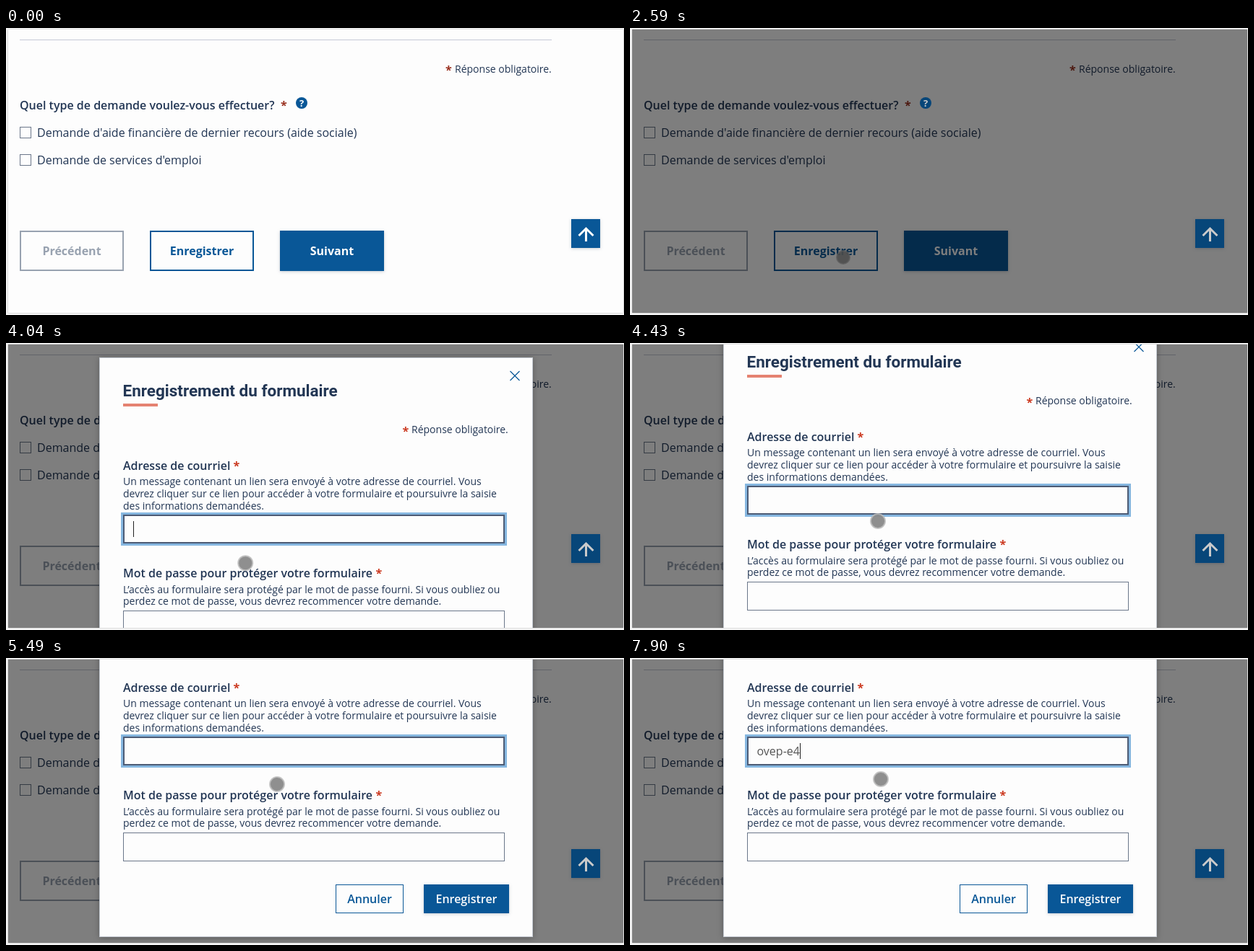
These frames come from a looping animation (855 px wide and 398 px high, 8 s). An HTML page:

```html
<!DOCTYPE html>
<html lang="fr">
<head>
<meta charset="utf-8">
<title>Enregistrement du formulaire</title>
<style>
html, body { margin: 0; width: 100%; height: 100%; overflow: hidden; background: #f6f6f6; }
svg { display: block; width: 100%; height: 100%; }
text { font: 16px "Open Sans", sans-serif; fill: #223654; white-space: pre; }
.small { font-size: 14px; }
.semi { font-weight: 600; }
.bold { font-weight: 700; }
.mid { text-anchor: middle; }
.title { font: 700 22.5px Roboto, sans-serif; }
.star { font-weight: 700; fill: #99301f; }
#modal .star { fill: #cb381f; }
.blue { fill: #095797; }
.white { fill: #fdfdfd; }
.muted { fill: #98a2b0; }
.box { fill: #fdfdfd; stroke: #6b778a; }
.outline { fill: #fdfdfd; stroke: #095797; }
.raised { filter: drop-shadow(0 1px 2px #22365440); }
#typed { fill: #555; }
</style>
</head>
<body>
<svg viewBox="0 0 855 398">
  <defs>
    <clipPath id="view"><rect x="3" y="2" width="851" height="393"/></clipPath>
  </defs>
  <rect x="2.5" y="1.5" width="852" height="394" rx="1" fill="#fdfdfd" stroke="#dedede"/>

  <g clip-path="url(#view)">
    <path d="M19 16.5H755" stroke="#c5c8d6"/>
    <text class="star" x="608" y="64">*</text>
    <text class="small" x="621" y="62">Réponse obligatoire.</text>
    <text class="semi" x="19" y="113">Quel type de demande voulez-vous effectuer?</text>
    <text class="star" x="380" y="113">*</text>
    <rect class="box" x="19.5" y="137.5" width="15" height="15"/>
    <text x="43" y="151">Demande d'aide financière de dernier recours (aide sociale)</text>
    <rect class="box" x="19.5" y="175.5" width="15" height="15"/>
    <text x="43" y="189">Demande de services d'emploi</text>

    <rect x="20" y="282" width="142" height="54" fill="#fdfdfd" stroke="#98a2b0" stroke-width="2"/>
    <text class="bold mid muted" x="91" y="315">Précédent</text>
    <rect class="outline" x="200" y="282" width="142" height="54" stroke-width="2"/>
    <text class="bold mid blue" x="271" y="315">Enregistrer</text>
    <rect class="blue raised" x="379" y="281" width="144" height="56"/>
    <text class="bold mid white" x="451" y="315">Suivant</text>

    <rect id="dim" x="3" y="2" width="851" height="393" opacity="0"/>

    <g id="icons">
      <circle class="blue" cx="409" cy="104" r="8"/>
      <text class="bold mid white" x="409" y="109" style="font-size:13px">?</text>
      <rect class="blue raised" x="782" y="265" width="40" height="40"/>
      <path d="M802.5 296V278M792.5 288l10-10 10 10" fill="none" stroke="#fdfdfd" stroke-width="3"/>
    </g>

    <g id="modal" opacity="0">
      <rect x="129.5" y="34.5" width="599" height="495" fill="#fdfdfd" stroke="#c5cad2" style="filter:drop-shadow(0 1px 4px #0004)"/>
      <path d="M697.5 53l13 13m0-13l-13 13" stroke="#095797" stroke-width="1.2"/>
      <text class="title" x="161.5" y="88">Enregistrement du formulaire</text>
      <rect x="162" y="98" width="48" height="4" fill="#e58271"/>
      <text class="star" x="548.5" y="142">*</text>
      <text class="small" x="561" y="139">Réponse obligatoire.</text>

      <text class="semi" x="162" y="190">Adresse de courriel</text>
      <text class="star" x="314.5" y="190">*</text>
      <text class="small" x="162" y="211">Un message contenant un lien sera envoyé à votre adresse de courriel. Vous</text>
      <text class="small" x="162" y="228">devrez cliquer sur ce lien pour accéder à votre formulaire et poursuivre la saisie</text>
      <text class="small" x="162" y="245">des informations demandées.</text>
      <rect x="159" y="249" width="534" height="46" fill="#86b7e0"/>
      <rect x="163" y="253" width="526" height="38" fill="#fdfdfd" stroke="#4c5b75" stroke-width="2"/>
      <text id="typed" x="175.5" y="278"></text>
      <rect id="caret" x="176" y="261" width="1" height="22" fill="#222"/>

      <text class="semi" x="162" y="339">Mot de passe pour protéger votre formulaire</text>
      <text class="star" x="511.5" y="339">*</text>
      <text class="small" x="162" y="361">L’accès au formulaire sera protégé par le mot de passe fourni. Si vous oubliez ou</text>
      <text class="small" x="162" y="377">perdez ce mot de passe, vous devrez recommencer votre demande.</text>
      <rect class="box" x="162.5" y="385.5" width="527" height="39"/>

      <rect class="outline" x="456.5" y="457.5" width="93" height="39"/>
      <text class="semi mid blue" x="503" y="483">Annuler</text>
      <rect class="blue raised" x="578" y="457" width="118" height="40"/>
      <text class="semi mid white" x="637" y="483">Enregistrer</text>
    </g>
  </g>

  <circle id="cursor" r="10" stroke-width="2" visibility="hidden"/>
</svg>
<script>
const LOOP = 8000;
const [dim, icons, modal, typed, caret, cursor] =
  ['dim', 'icons', 'modal', 'typed', 'caret', 'cursor'].map(id => document.getElementById(id));

// Keyframes: [time, value, ...]
const pointerPath = [
  [1150, 415, 393], [1350, 372, 362], [1600, 312, 327], [1840, 295, 318],
  [3520, 295, 318], [3750, 327, 326], [3900, 327, 326], [4430, 343, 247],
  [4700, 351, 225], [4790, 351, 225], [4970, 359, 204], [5120, 359, 204],
  [5490, 375, 175], [5620, 375, 175], [5880, 375, 169], [6210, 375, 169], [6400, 347, 168]
];
const scrollPath = [
  [3900, 0], [4430, 54], [4700, 86], [4770, 88], [4970, 113], [5120, 113], [5490, 143]
];
const dimPath = [[2480, 0], [2590, .5]];
const modalPath = [[2640, 0], [2840, 1]];

const email = 'ovep-e4';
const keyTimes = [6790, 6870, 6950, 7040, 7780, 7840, 7900];
const caretOff = [[3110, 3570], [4070, 4570], [5150, 5640], [6260, 6790], [7500, 7780]];

function at(path, t) {
  const next = path.findIndex(key => key[0] > t);
  if (next === 0) return path[0].slice(1);
  if (next < 0) return path[path.length - 1].slice(1);
  const a = path[next - 1], b = path[next];
  const k = (t - a[0]) / (b[0] - a[0]);
  return a.slice(1).map((v, i) => v + (b[i + 1] - v) * k);
}

const within = (t, [from, to]) => t >= from && t < to;

function set(node, attributes) {
  for (const name in attributes) node.setAttribute(name, attributes[name]);
}

function draw(t) {
  const [shade] = at(dimPath, t);
  set(dim, { opacity: shade });
  icons.style.filter = shade ? `brightness(${1 - shade * .4})` : 'none';

  const [scroll] = at(scrollPath, t);
  set(modal, { opacity: at(modalPath, t)[0], transform: `translate(0 ${-Math.round(scroll)})` });

  const text = email.slice(0, keyTimes.filter(time => time <= t).length);
  if (typed.textContent !== text) typed.textContent = text;
  set(caret, {
    x: 176 + (text ? Math.round(typed.getComputedTextLength() - .5) : 0),
    visibility: caretOff.some(span => within(t, span)) ? 'hidden' : 'visible'
  });

  const [x, y] = at(pointerPath, t);
  const pressed = within(t, [2490, 2650]);
  set(cursor, {
    cx: x, cy: y, r: pressed ? 9 : 10,
    fill: pressed ? '#4c4c4ce0' : '#888888f0',
    stroke: pressed ? '#5c5c5cc0' : '#bdbdbdd0',
    visibility: t < 1150 ? 'hidden' : 'visible'
  });
}

let start;
function tick(now) {
  start ??= now;
  draw((now - start) % LOOP);
  requestAnimationFrame(tick);
}
draw(0);
requestAnimationFrame(tick);
</script>
</body>
</html>
```
